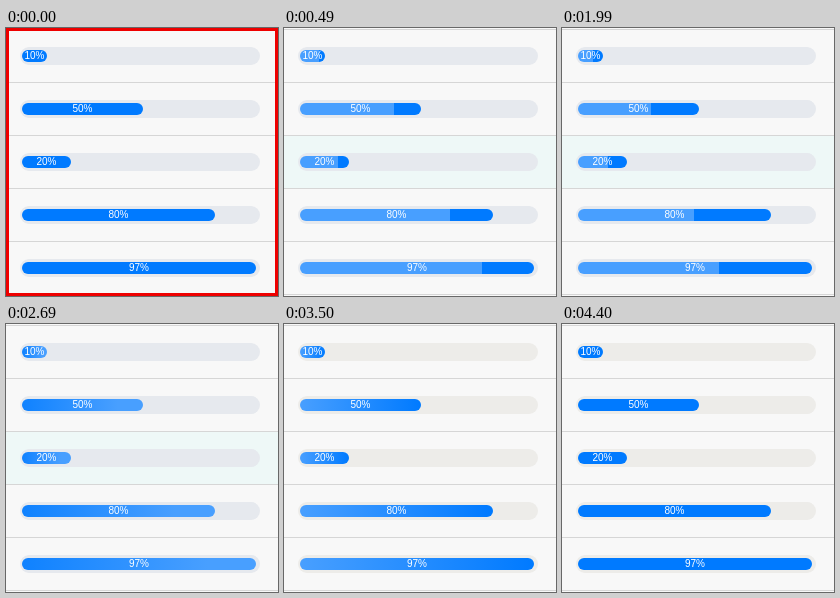
Write an HTML page that moves like this. It is 272 px wide and 268 px high and loops after 4.5 s.

```html
<!DOCTYPE html>
<html lang="en">
<head>
<meta charset="utf-8">
<style>
  html, body { margin: 0; width: 100%; height: 100%; overflow: hidden; background: #f8f8f8; }
  #stage { position: relative; width: 272px; height: 268px; overflow: hidden; }
  #stage::before { content: ""; position: absolute; top: 1px; width: 100%; height: 1px; background: #d6d6d6; }
  #list { position: absolute; top: 2px; width: 100%; }
  .row { position: relative; box-sizing: border-box; height: 53px; border-bottom: 1px solid #d6d6d6; }
  .hover .row:nth-child(3) { background: #eef8f7; }
  .track { position: absolute; left: 14px; top: 17px; width: 240px; height: 18px; border-radius: 9px; background: var(--track); }
  .fill {
    position: absolute; left: 2px; top: 3px; height: 12px; border-radius: 6px; background: var(--fill);
    color: #fff; font: 10px/12px "Liberation Sans", Arial, sans-serif; text-align: center;
  }
  #frame { position: absolute; inset: 0; border: 3px solid #ee0000; }
</style>
</head>
<body>
<div id="stage">
  <div id="list"></div>
  <div id="frame"></div>
</div>
<script>
const LOOP = 4500, DARK = '#007aff', LIGHT = '#489fff';
const stage = document.getElementById('stage');
const frame = document.getElementById('frame');

document.getElementById('list').innerHTML = [10, 50, 20, 80, 97].map(p =>
  `<div class="row"><div class="track"><div class="fill" style="width:${1 + 2.4 * p}px">${p}%</div></div></div>`
).join('');

// Time in ms -> number of sweeps done; the colours swap on every sweep.
const keys = [[0, 0], [490, .777], [1300, 1.647], [1990, 2.602], [2390, 3],
              [3150, 4], [3850, 5], [4360, 6], [LOOP, 6]];

function sweepsAt(t) {
  const i = keys.findIndex(k => k[0] > t);
  const [t0, v0] = keys[i - 1], [t1, v1] = keys[i];
  return v0 + (v1 - v0) * (t - t0) / (t1 - t0);
}

function fillAt(t) {
  const sweeps = sweepsAt(t);
  if (t < 30 || sweeps >= 6) return DARK;
  const n = Math.floor(sweeps), u = sweeps - n;
  const [fresh, old] = n % 2 ? [DARK, LIGHT] : [LIGHT, DARK];
  // The first three sweeps have a hard edge, the others a wide soft one.
  const [from, to] = n < 3 ? [u, u] : [2 * u - 1, 2 * u];
  return `linear-gradient(90deg, ${fresh} ${from * 100}%, ${old} ${to * 100}%)`;
}

function draw(now) {
  const t = now % LOOP;
  frame.hidden = t >= 30;
  stage.classList.toggle('hover', t >= 30 && t < 3130);
  stage.style.setProperty('--track', t < 3130 ? '#e6e9ee' : '#edece9');
  stage.style.setProperty('--fill', fillAt(t));
}

const start = performance.now();
function tick() {
  draw(performance.now() - start);
  requestAnimationFrame(tick);
}
tick();
</script>
</body>
</html>
```
